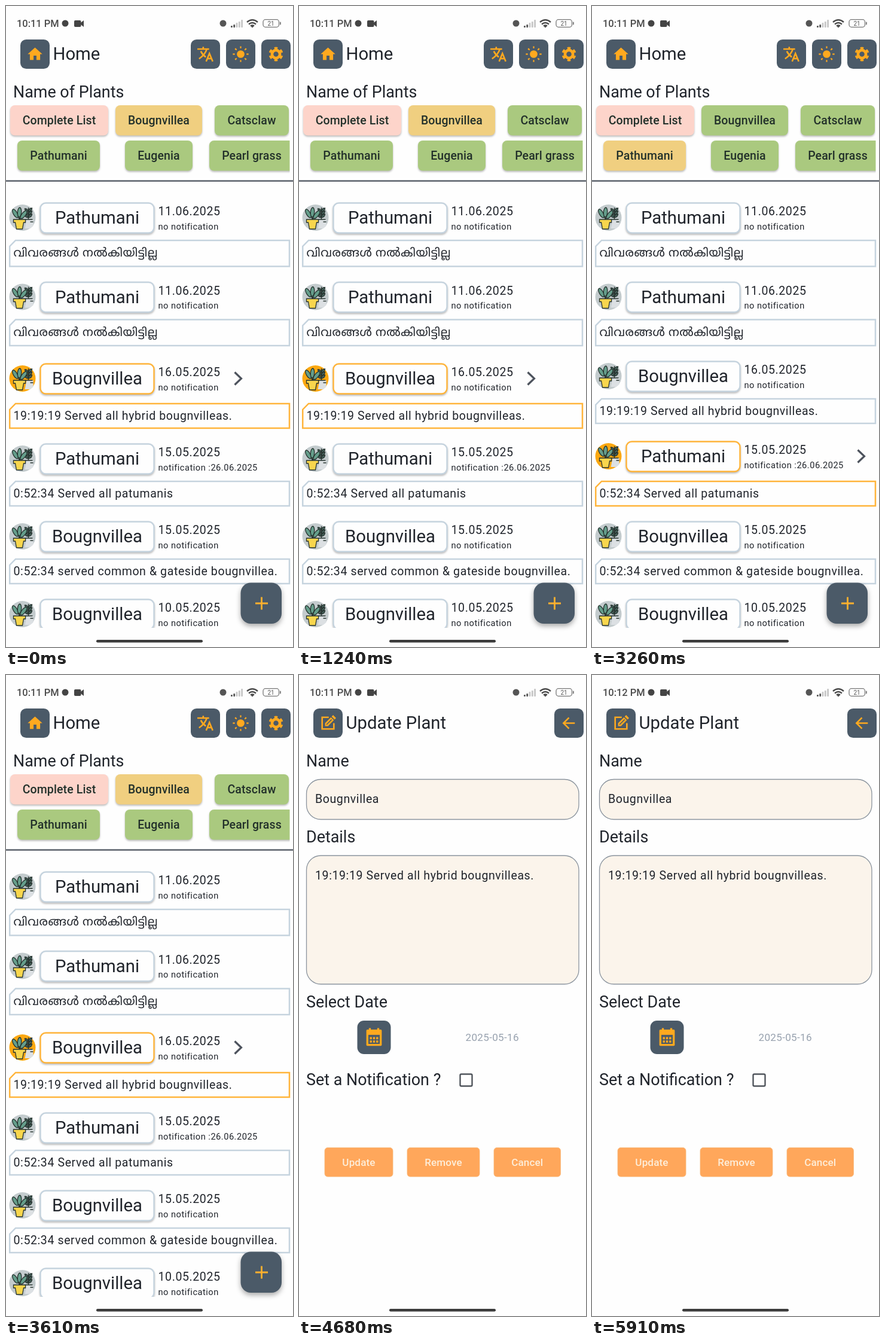
These frames come from a looping animation (480x1072 px, 5.97 s). An HTML page:

```html
<!DOCTYPE html>
<html lang="en">
<head>
<meta charset="utf-8">
<title>Plant diary</title>
<style>
html, body { margin: 0; width: 100%; height: 100%; overflow: hidden; background: #fefefe; }
svg { display: block; width: 100vw; height: 100vh; }
text { font-family: Roboto, "Noto Sans Malayalam", "Noto Sans", sans-serif; fill: #20242b; white-space: pre; }
.title { font-size: 29.3px; }
.head { font-size: 26.9px; }
.body { font-size: 19.5px; letter-spacing: .61px; }
.small { font-size: 14.65px; letter-spacing: .49px; }
.chip { font-size: 19.5px; font-weight: 500; letter-spacing: .12px; fill: #22302a; }
.button { font-size: 17.1px; font-weight: 500; letter-spacing: .12px; fill: #fdeeda; }
.date { font-size: 17.1px; letter-spacing: .3px; fill: #97a1ae; }
.clock { font-size: 16.4px; font-weight: 500; fill: #4a4a4a; }
.mid { text-anchor: middle; }
.icon { fill: none; stroke: #ffa91f; stroke-width: 2.1; }
.icon .solid { fill: #ffa91f; stroke: none; }
.shade { filter: drop-shadow(0 2px 1.5px #0004); }
.high { filter: drop-shadow(0 4px 4px #0005); }
</style>
</head>
<body>
<svg id="stage" viewBox="0 0 480 1072" preserveAspectRatio="none"></svg>
<script>
const LOOP = 5970, SLATE = '#4b5a68', GOLD = '#ffb43a';
const stage = document.getElementById('stage');

const text = (x, y, cls, s) => `<text x="${x}" y="${y}" class="${cls}">${s}</text>`;
const rect = (x, y, w, h, r, fill, more = '') =>
  `<rect x="${x}" y="${y}" width="${w}" height="${h}" rx="${r}" fill="${fill}" ${more}/>`;
const path = (d, more = '') => `<path d="${d}" ${more}/>`;
const circle = (x, y, r, more = '') => `<circle cx="${x}" cy="${y}" r="${r}" ${more}/>`;

// Icons are drawn on a 24-unit grid.
const icons = {
  home: path('M10 20v-6h4v6h5v-8h3L12 3 2 12h3v8z', 'class="solid"'),
  language: path('M1 5H17M9 2V5M14 5Q11.5 13 3.3 18.3M5.7 8Q8 13 12.5 16M13 22L17.5 11 22 22M14.5 18H20.5'),
  sun: circle(12, 12, 5.2, 'class="solid"') +
    circle(12, 12, 9.3, 'stroke-width="2.8" pathLength="32" stroke-dasharray="1 3" stroke-dashoffset=".5"'),
  gear: circle(12, 12, 5.4, 'stroke-width="3.8"') +
    circle(12, 12, 8.3, 'stroke-width="3" pathLength="12" stroke-dasharray="1 1" stroke-dashoffset="-.5"'),
  edit: path('M13 4H4V20H20V12') +
    path('M8 16v-4L16 4l4 4-8 8zM17 3l2-2 4 4-2 2z', 'class="solid"') + path('M10 14L17 7', `stroke="${SLATE}" stroke-width="1.2"`),
  back: path('M20 12H5M12 4.5L4.5 12 12 19.5'),
  calendar: path('M4 4H20V21H4zM7 1V4M17 1V4', 'stroke-width="2.4" stroke-linejoin="round"') +
    path('M4 4H20V9H4z', 'class="solid"') +
    path('M7 13H17M7 17H17', 'stroke-width="2.6" stroke-dasharray="2.4 1.4"')
};

const tile = (icon, x, y = 56, size = 49) => rect(x, y, size, size, size * .2, SLATE) +
  `<g class="icon" transform="translate(${x + size / 2} ${y + size / 2}) scale(${size / 40}) translate(-12 -12)">${icons[icon]}</g>`;

function statusBar(clock) {
  const bars = [3, 5, 8, 10, 13].map((h, i) =>
    rect(376 + i * 4.3, 36 - h, 2.8, h, 1, i < 2 ? '#555' : '#c6c6c6')).join('');
  return text(18, 35, 'clock', clock) + circle(99, 29, 5.5, 'fill="#444"') +
    rect(114, 24, 11.5, 11, 2, '#444') + path('M125 28L130 24V35L125 31z', 'fill="#444"') +
    circle(363, 29, 5.5, 'fill="#555"') + bars +
    path('M403 27Q412 19.5 421 27M406 30.5Q412 25.5 418 30.5M409 33.5Q412 31.5 415 33.5', 'fill="none" stroke="#4a4a4a" stroke-width="2.3"') +
    circle(412, 34.5, 1.6, 'fill="#4a4a4a"') +
    rect(430, 22.7, 26.5, 12.6, 4, 'none', 'stroke="#777" stroke-width="1.3"') + rect(458, 26.5, 1.8, 5, 1, '#777') +
    `<text x="443" y="32.7" class="mid" font-size="10" style="fill:#555">21</text>`;
}

function avatar(y, on) {
  const leaf = (x, y, turn) => `<ellipse rx="3.2" ry="8" fill="#659e8b" transform="translate(${x} ${y}) rotate(${turn})"/>`;
  const sprig = [-15, -10, -5].map(y =>
    path(`M10 ${y + 5}q-6 0-6-5q5 0 6 5q0-6 6-6q0 5-6 6`, 'fill="#47645d"')).join('');
  return `<g transform="translate(27.5 ${y})" stroke="#26332f" stroke-width="1.3">` +
    circle(0, 0, 22, `fill="${on ? '#fba811' : '#c3cbcd'}" stroke="none"`) +
    path('M7 3H18V14L13 18H4z', 'fill="#dce0e3" stroke="none"') +
    path('M10-17V3M5 3H17M13 7H18M-5 3L-9-5M-5 3V-8M-5 3L1-5', 'fill="none"') + sprig +
    leaf(-12, -7, -30) + leaf(-5, -9, 4) + leaf(2, -5, 38) +
    path('M-15 3H5V8H2L0 19H-10L-12 8H-15z', 'fill="#f8d64d"') + '</g>';
}

const EMPTY = 'വിവരങ്ങൾ നൽകിയിട്ടില്ല', NONE = 'no notification';
const entries = [
  ['Pathumani', '11.06.2025', NONE, EMPTY],
  ['Pathumani', '11.06.2025', NONE, EMPTY],
  ['Bougnvillea', '16.05.2025', NONE, '19:19:19 Served all hybrid bougnvilleas.'],
  ['Pathumani', '15.05.2025', 'notification :26.06.2025', '0:52:34 Served all patumanis'],
  ['Bougnvillea', '15.05.2025', NONE, '0:52:34 served common &amp; gateside bougnvillea.'],
  ['Bougnvillea', '10.05.2025', NONE, '']
];

// A selected entry is 8px taller, with its heading centred in the extra room.
function list(selected) {
  let y = 354, out = '';
  entries.forEach(([name, date, note, detail], i) => {
    const on = i === selected, edge = on ? GOLD : '#c5d3de', mid = y + (on ? 4 : 0);
    const top = y + 38 + (on ? 8 : 0), h = detail === EMPTY ? 43.5 : 41;
    out += avatar(mid, on) +
      rect(57.5, mid - 24.5, 190, 50, 9, '#fefefe', `class="shade" stroke="${edge}" stroke-width="2.4"`) +
      text(152.5, mid + 10.3, 'title mid', name) +
      text(254.5, mid - 4, 'body', date) + text(254.5, mid + 19.5, 'small', note);
    if (on) {
      const x = note === NONE ? 382.5 : 444.5;
      out += path(`M${x} ${mid - 10.5}l11 10.5l-11 10.5`, 'fill="none" stroke="#4d535d" stroke-width="3.2"');
    }
    if (detail) out += path(`M16 ${top}H474V${top + h}H6.2V${top + 10}z`, `fill="#fefefe" stroke="${edge}" stroke-width="2.5"`) +
      text(12.5, top + (detail === EMPTY ? 27 : 27.2), detail === EMPTY ? 'malayalam' : 'body', detail);
    y = top + h + 51;
  });
  return out;
}

const chips = [
  ['Complete List', 7, 166, 164], ['Bougnvillea', 183, 166, 145], ['Catsclaw', 349, 166, 124],
  ['Pathumani', 19, 225, 138], ['Eugenia', 199, 225, 113], ['Pearl grass', 340, 225, 142]
];

function home(selected) {
  const chosen = entries[selected][0];
  const row = chips.map(([name, x, y, w], i) =>
    rect(x, y, w, 50.5, 8, i === 0 ? '#fdd4ca' : name === chosen ? '#f0cf80' : '#aac97f', 'class="shade"') +
    text(x + w / 2, y + 31.5, 'chip mid', name)).join('');
  return tile('home', 24) + tile('language', 309) + tile('sun', 368) + tile('gear', 427) +
    text(78.5, 90, 'title', 'Home') + text(12, 152.5, 'head', 'Name of Plants') +
    `<clipPath id="chips"><path d="M0 150H474.500V290H0z"/></clipPath><g clip-path="url(#chips)">${row}</g>` +
    rect(0, 291.3, 480, 2.5, 0, '#5b626c') +
    `<clipPath id="list"><path d="M0 294H480V1040H0z"/></clipPath><g clip-path="url(#list)">${list(selected)}</g>` +
    rect(392.5, 964.5, 68.5, 68.5, 17, SLATE, 'class="high"') +
    path('M417 999H438M427.500 988.500V1009.500', 'stroke="#ffb02e" stroke-width="2.8"');
}

function editor() {
  const field = (y, h) => rect(12.5, y, 455.5, h, 24, '#fbf4eb', 'stroke="#8b949e" stroke-width="1.3"');
  const button = (x, w, s) => rect(x, 790.5, w, 48.5, 5, '#ffa75b', 'stroke="#f8b87a" stroke-width=".8"') +
    text(x + w / 2, 821, 'button mid', s);
  return tile('edit', 24) + tile('back', 427) + text(78.5, 90, 'title', 'Update Plant') +
    text(12, 152.5, 'head', 'Name') + field(174.5, 67) + text(27, 214, 'body', 'Bougnvillea') +
    text(12, 280, 'head', 'Details') + field(302, 215) + text(27, 342, 'body', entries[2][3]) +
    text(12, 555.5, 'head', 'Select Date') + tile('calendar', 97.5, 578, 56) +
    text(278.5, 612, 'date', '2025-05-16') + text(12, 686, 'head', 'Set a Notification ?') +
    rect(269.5, 667.5, 20, 20, 2, 'none', 'stroke="#50555c" stroke-width="2.4"') +
    button(43, 114, 'Update') + button(181, 121, 'Remove') + button(326, 111.5, 'Cancel');
}

const scenes = [
  [0, () => home(2), '10:11 PM'],
  [1400, () => home(3), '10:11 PM'],
  [3610, () => home(2), '10:11 PM'],
  [4390, editor, '10:11 PM'],
  [5560, editor, '10:12 PM']
];
let shown;

function draw() {
  const t = performance.now() % LOOP;
  const scene = scenes.findLast(([start]) => t >= start);
  if (scene !== shown) {
    shown = scene;
    stage.innerHTML = statusBar(scene[2]) + scene[1]() + rect(151, 1060, 178, 4.5, 2.2, '#3c3c3c');
  }
  requestAnimationFrame(draw);
}
document.head.insertAdjacentHTML('beforeend', '<style>.malayalam { font-size: 19.5px; letter-spacing: .61px; }</style>');
draw();
</script>
</body>
</html>
```
